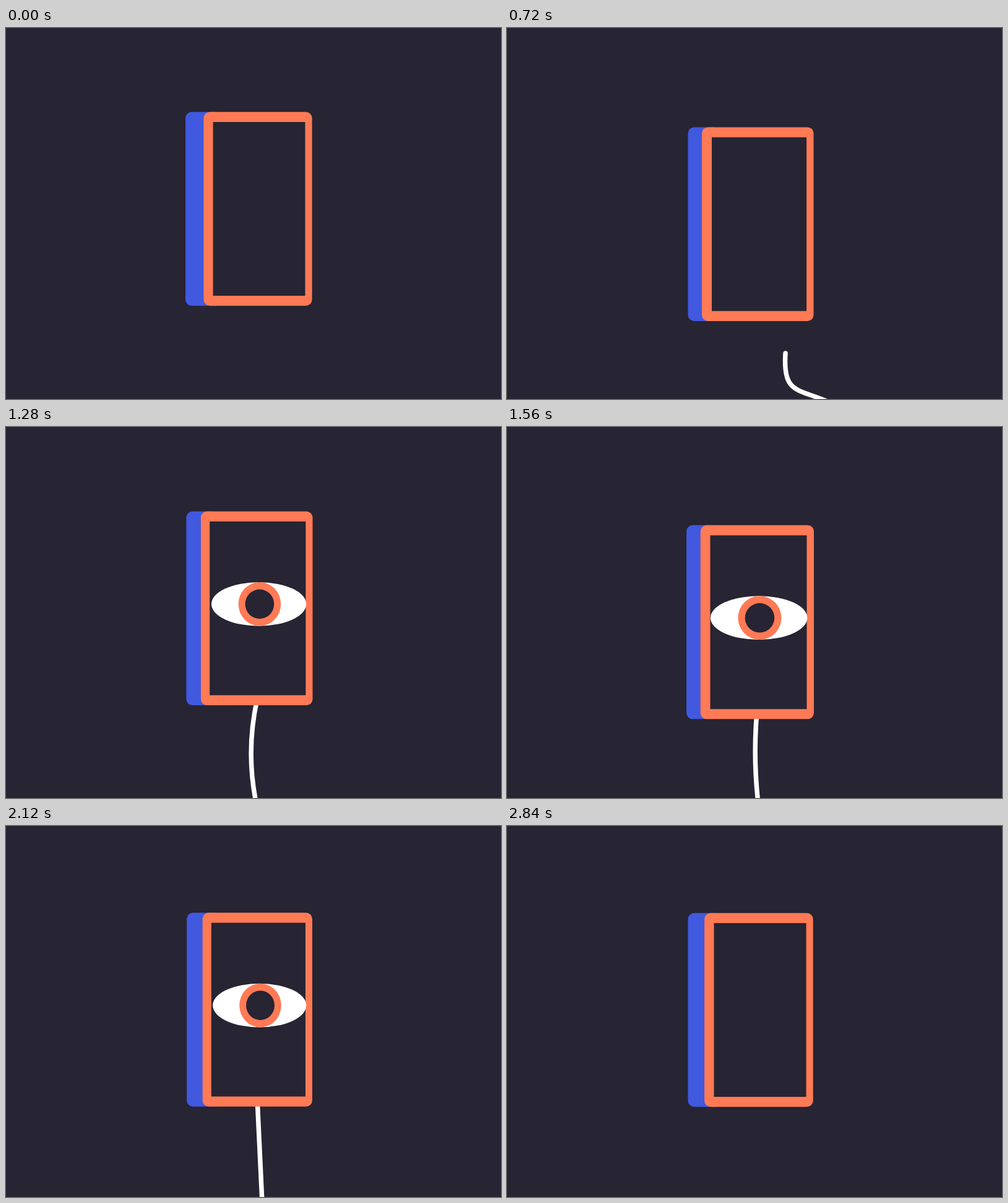
An HTML page with a canvas for the animation above (2.88 s loop, 800 by 600 pixels).

```html
<!DOCTYPE html>
<html lang="en">
<head>
<meta charset="utf-8">
<title>Plugged eye</title>
<style>
  html, body { margin: 0; width: 100%; height: 100%; overflow: hidden; background: #272433; }
  canvas { display: block; width: 800px; height: 600px; }
</style>
</head>
<body>
<canvas width="800" height="600"></canvas>
<script>
const ctx = document.querySelector('canvas').getContext('2d');
const DARK = '#272433', BLUE = '#4159df', ORANGE = '#ff7a55', WHITE = '#fff';
const LOOP = 2880, STEP = 40, SWAY = 960, HEIGHT = 313.5;

const clamp = p => Math.min(1, Math.max(0, p));
const smooth = p => p * p * (3 - 2 * p);
const mix = (a, b, p) => a + (b - a) * p;
const ramp = (t, from, to) => clamp((t - from) / (to - from));

// Swings 1 -> 0 -> 1 once per sway, starting at the given delay.
function sway(t, delay) {
  const p = ((t - delay + SWAY) % SWAY) / (SWAY / 2);
  return smooth(Math.abs(1 - p));
}

// Each bob rises less high than the one before.
function phoneTop(t) {
  const bob = Math.floor((t + 280) / SWAY) % 3;
  return 161 - 40.5 * 0.715 ** bob * sway(t, 200);
}

// One slow arc, then quicker ones.
function backEdge(t) {
  const arc = t < 1560 ? t / 1560 : (t - 1560) / 840;
  return 290 + 2.5 * Math.abs(Math.sin(Math.PI * arc));
}

// The plug comes up, stays in the phone, then drops out.
function plugPosition(t) {
  const path = [
    [480, 525, 615], [720, 450, 526], [1040, 406, 440],
    [2240, 406, 440], [2360, 416, 497], [2480, 422, 612]
  ];
  const i = path.findIndex(key => key[0] >= t);
  const [t0, x0, y0] = path[i - 1], [t1, x1, y1] = path[i];
  const p = ramp(t, t0, t1);
  return [mix(x0, x1, p), mix(y0, y1, p)];
}

function box(color, left, top, right, bottom, radius) {
  ctx.fillStyle = color;
  ctx.beginPath();
  ctx.roundRect(left, top, right - left, bottom - top, radius);
  ctx.fill();
}

function oval(color, x, y, rx, ry) {
  ctx.fillStyle = color;
  ctx.beginPath();
  ctx.ellipse(x, y, rx, ry, 0, 0, 2 * Math.PI);
  ctx.fill();
}

function drawCable(t) {
  if (t <= 480 || t > 2480) return;
  const [x, y] = plugPosition(t);
  const whip = Math.sin(Math.PI * ramp(t, 510, 1180)) ** 2;
  const bow = 27 * (1 - (t - 720) / 1600) ** 2 * (t < 2320);
  const tailX = 403.5 + 165 * whip + 15 * ramp(t, 1280, 2360) ** 1.5;
  const tailY = 604;
  ctx.strokeStyle = WHITE;
  ctx.lineWidth = 7.5;
  ctx.lineCap = 'round';
  ctx.beginPath();
  ctx.moveTo(x, y);
  ctx.bezierCurveTo(
    mix(x, tailX, 1 / 3) - bow, mix(y, tailY, 1 / 3) + 56 * whip,
    mix(x, tailX, 2 / 3) - bow, mix(y, tailY, 2 / 3) + 7 * whip,
    tailX, tailY);
  ctx.stroke();
}

function drawPhone(t, top) {
  const outer = sway(t, 40), inner = sway(t, 0);
  const left = mix(312.1, 319.6, outer), right = mix(496.1, 494.6, outer);
  const bottom = top + HEIGHT;
  box(BLUE, backEdge(t), top, left + 20, bottom, [10, 0, 0, 10]);
  box(ORANGE, left, top, right, bottom, 10);
  box(DARK, mix(327.3, 334.6, inner), top + 16.3,
      mix(484.7, 483.5, inner), bottom - 16.2, 0);
}

function drawEye(t, top) {
  const open = smooth(ramp(t, 1060, 1200)) * smooth(ramp(t, 2480, 2320));
  if (!open) return;
  const left = mix(328.8, 335.1, sway(t, 80)), right = 485.3;
  const rx = (right - left) / 2, x = left + rx, y = top + 149.8;
  const squeeze = rx / 78.25;
  ctx.save();
  oval(WHITE, x, y + 6 * (1 - open), rx, 35.4 * open);
  ctx.clip();
  oval(ORANGE, x + 1.3, y, 35 * squeeze, 35.4);
  oval(DARK, x + 1.3, y, 23.8 * squeeze, 23.8);
  ctx.restore();
}

function draw() {
  const t = Math.floor(performance.now() % LOOP / STEP) * STEP;
  const top = phoneTop(t);
  ctx.fillStyle = DARK;
  ctx.fillRect(0, 0, 800, 600);
  drawCable(t);
  drawPhone(t, top);
  drawEye(t, top);
  requestAnimationFrame(draw);
}
draw();
</script>
</body>
</html>
```
